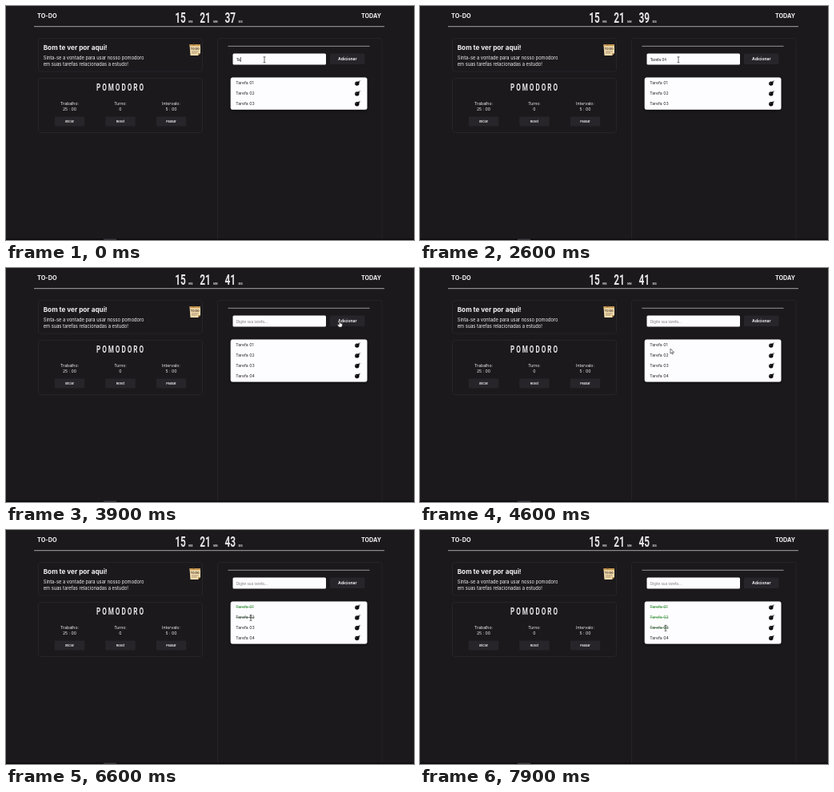
These frames come from a looping animation (510x293 px, 8 s). An HTML page:

```html
<!DOCTYPE html>
<html lang="pt-BR">
<head>
<meta charset="utf-8">
<title>Lista de tarefas</title>
<style>
  html, body { margin: 0; width: 100%; height: 100%; overflow: hidden; background: #1b191c; }
  svg { display: block; width: 510px; height: 293px; }
  text { font-family: Inter, sans-serif; fill: #f4f2f5; white-space: pre; }
  .mid { text-anchor: middle; }
  .bold { font-weight: 700; }
  .small { font-size: 5.2px; }
  .field { font: 4.85px "Liberation Sans", Arial, sans-serif; fill: #222; }
  .condensed { font-family: Roboto, sans-serif; font-weight: 700; text-anchor: middle; transform: scaleX(.66); fill: #e6e4e7; }
  .panel { fill: none; stroke: #2a282c; stroke-width: .8; }
  .button { fill: #272529; }
  .cursor { stroke-linejoin: round; }
</style>
</head>
<body>
<svg viewBox="0 0 510 293">
  <defs>
    <filter id="shadow" x="-10%" y="-20%" width="120%" height="150%">
      <feDropShadow dx="0" dy="1" stdDeviation="2" flood-color="#000" flood-opacity=".6"/>
    </filter>
    <g id="bomb">
      <circle r="2.7" fill="#0c0b0d"/>
      <path d="M1 -2L2.2 -3.2L3.4 -2L2.3 -.8z" fill="#0c0b0d"/>
      <path d="M2.5 -2.6Q3 -3.8 4 -3.4" fill="none" stroke="#222" stroke-width=".6"/>
      <circle cx="-1" cy="-.8" r=".6" fill="#777"/>
    </g>
  </defs>

  <rect width="510" height="293" fill="#1b191c"/>
  <rect y="291.5" width="510" height="1.5" fill="#0b0a0c"/>
  <rect x="122" y="291.5" width="16" height="1.5" fill="#39373b"/>

  <text class="bold" x="39" y="15.3" font-size="7.3">TO-DO</text>
  <text class="bold" x="469" y="15.3" font-size="7.2" text-anchor="end">TODAY</text>
  <path d="M35 25.7H473" stroke="#b5b3b6" stroke-width=".9"/>
  <g id="clock"></g>

  <rect class="panel" x="40.5" y="40.5" width="205" height="41.5" rx="3"/>
  <text class="bold" x="46.7" y="55.2" font-size="8.2">Bom te ver por aqui!</text>
  <g font-size="5.75">
    <text x="46.7" y="67">Sinta-se a vontade para usar nosso pomodoro</text>
    <text x="46.7" y="74.7">em suas tarefas relacionadas a estudo!</text>
  </g>
  <g>
    <path d="M229.5 48.5H243V59L240 62H230.5z" fill="#f2dcae"/>
    <path d="M229.5 48H243V50.3H229.5z" fill="#c99a55"/>
    <circle cx="234.5" cy="47.3" r="1.2" fill="#33231c"/>
    <path d="M243 59L240 62V59z" fill="#b98d50"/>
    <text class="mid bold" x="236.3" y="55" font-size="3.5" style="fill:#3a2a20">TO DO</text>
    <path d="M232 57H240.5M232 59H238.5" stroke="#8d7454" stroke-width=".7"/>
  </g>

  <rect class="panel" x="40.5" y="90.5" width="205" height="68" rx="3"/>
  <g transform="translate(143.5 106.4)"><text class="condensed" font-size="12.3" letter-spacing="3">POMODORO</text></g>
  <g id="timers"></g>

  <path class="panel" d="M264.5 291.5V43.5Q264.5 40.5 267.5 40.5H467Q470 40.5 470 43.5V291.5"/>
  <path d="M277.5 50.3H454.5" stroke="#b5b3b6" stroke-width=".8"/>
  <rect x="283.5" y="59.5" width="116.5" height="14" rx="1.5" fill="#fdfcfe"/>
  <text id="field" class="field" x="287.7" y="68.5"></text>
  <rect id="caret" y="64" width=".7" height="6" fill="#111"/>
  <rect class="button" x="405" y="59.5" width="43.5" height="13.5" rx="1.5"/>
  <text class="mid bold" x="426.8" y="68" font-size="5">Adicionar</text>

  <rect id="card" x="280.8" y="89.4" width="170.6" rx="2.5" fill="#fdfcfe" filter="url(#shadow)"/>
  <g id="tasks"></g>

  <g id="arrow" class="cursor">
    <path d="M0 0V6.2L1.5 4.9L2.5 7L3.4 6.6L2.5 4.6H4.5z" fill="#fff" stroke="#222" stroke-width=".6"/>
  </g>
  <g id="hand" class="cursor">
    <path d="M-.7 -1.5Q0 -2.5 .7 -1.5V1L3.4 1.7V4L2.6 6H-1L-2.8 3L-2 2.3L-.7 3.2z" fill="#fff" stroke="#222" stroke-width=".6"/>
  </g>
  <g id="beam" class="cursor">
    <path d="M-1.4 -3.5H1.4M0 -3.5V3.5M-1.4 3.5H1.4" fill="none" stroke="#333" stroke-width=".7"/>
  </g>
</svg>
<script>
const LOOP = 8000, ROW = 12.8, FIRST_ROW = 96.5;
const ADDED = 3900, BLUR = 3800, FADE = 200;
const ENTRY = 'Tarefa 04';
const keyTimes = [100, 200, 400, 500, 1400, 1900, 2100];
const doneTimes = [5250, 6550, 7800, Infinity];
const pointerPath = [
  [0, 323, 67.3], [2900, 323, 67.3], [3130, 372, 80], [3400, 417, 68],
  [4050, 417, 68], [4600, 313, 101], [4900, 301, 95.6],
  [5550, 301, 95.6], [5820, 314, 112], [6100, 306, 109.8],
  [6850, 306, 109.8], [7170, 327, 149], [7500, 307, 122.8], [LOOP, 307, 122.8]
];
const $ = id => document.getElementById(id);
const clamp = v => Math.max(0, Math.min(1, v));
const mix = (a, b, k) => a + (b - a) * k;

$('clock').innerHTML = [[218, 'HRS', 15], [249, 'MIN', 21], [280.3, 'SEG', 37]].map(([x, unit, value]) =>
  `<g transform="translate(${x} 21.4)"><text class="condensed" font-size="18">${value}</text></g>
   <g transform="translate(${x + 12.8} 21)"><text class="condensed" font-size="4.2">${unit}</text></g>`).join('');
const seconds = $('clock').querySelectorAll('text')[4];

$('timers').innerHTML = [
  [79.5, 'Trabalho:', '25 : 00', 'Iniciar'],
  [143, 'Turno:', '0', 'Reset'],
  [206.5, 'Intervalo:', '5 : 00', 'Pausar']
].map(([x, label, value, action]) =>
  `<text class="mid small" x="${x}" y="123.8">${label}</text>
   <text class="mid small" x="${x}" y="131.4">${value}</text>
   <rect class="button" x="${x - 18.7}" y="138.4" width="37.4" height="12" rx="1"/>
   <text class="mid" x="${x}" y="145.7" font-size="3.8" font-weight="600">${action}</text>`).join('');

$('tasks').innerHTML = doneTimes.map((_, i) =>
  `<g transform="translate(0 ${FIRST_ROW + i * ROW})">
   <text class="small" x="287.2" y="1.9">Tarefa 0${i + 1}</text><use href="#bomb" x="438.8" y=".6"/></g>`).join('');
const tasks = [...$('tasks').children];

function pointerAt(t) {
  const i = pointerPath.findIndex(p => p[0] > t);
  const [t0, x0, y0] = pointerPath[i - 1], [t1, x1, y1] = pointerPath[i];
  const k = (t - t0) / (t1 - t0), e = k * k * (3 - 2 * k);
  return [mix(x0, x1, e), mix(y0, y1, e)];
}

function cursorKind(x, y) {
  const inside = (l, r, top, bottom) => x > l && x < r && y > top && y < bottom;
  if (inside(283, 400, 59, 74)) return 'beam';
  if (inside(405, 449, 59, 73)) return 'hand';
  const overText = tasks.some((_, i) => Math.abs(y - FIRST_ROW - i * ROW) < 3.5);
  return overText && x > 286 && x < 311 ? 'beam' : 'arrow';
}

function drawField(t) {
  const pressed = keyTimes.filter(k => k <= t);
  const lastKey = pressed.at(-1) ?? 0;
  const empty = t >= ADDED;
  const field = $('field');
  field.textContent = empty ? 'Digite sua tarefa...' : ENTRY.slice(0, 2 + pressed.length);
  field.style.fill = empty ? '#858387' : '#222';
  const caretOn = t < BLUR && Math.floor((t - lastKey) / 500) % 2 === 0;
  $('caret').style.display = caretOn ? '' : 'none';
  $('caret').setAttribute('x', 287.7 + field.getComputedTextLength());
}

function drawTasks(t) {
  const count = t < ADDED ? 3 : 4;
  $('card').setAttribute('height', 1.9 + count * ROW);
  tasks.forEach((task, i) => {
    task.style.display = i < count ? '' : 'none';
    const label = task.firstElementChild, k = clamp((t - doneTimes[i]) / FADE);
    label.style.fill = `rgb(${mix(38, 62, k)}, ${mix(36, 150, k)}, ${mix(40, 66, k)})`;
    label.style.textDecoration = t >= doneTimes[i] ? 'line-through' : 'none';
  });
}

function drawCursor(t) {
  const [x, y] = pointerAt(t), kind = cursorKind(x, y);
  for (const id of ['arrow', 'hand', 'beam']) {
    $(id).style.display = id === kind ? '' : 'none';
    $(id).setAttribute('transform', `translate(${x} ${y})`);
  }
}

const start = performance.now();
function frame() {
  const t = (performance.now() - start) % LOOP;
  seconds.textContent = 37 + Math.floor((t + 100) / 1000);
  drawField(t);
  drawTasks(t);
  drawCursor(t);
  requestAnimationFrame(frame);
}
frame();
</script>
</body>
</html>
```
